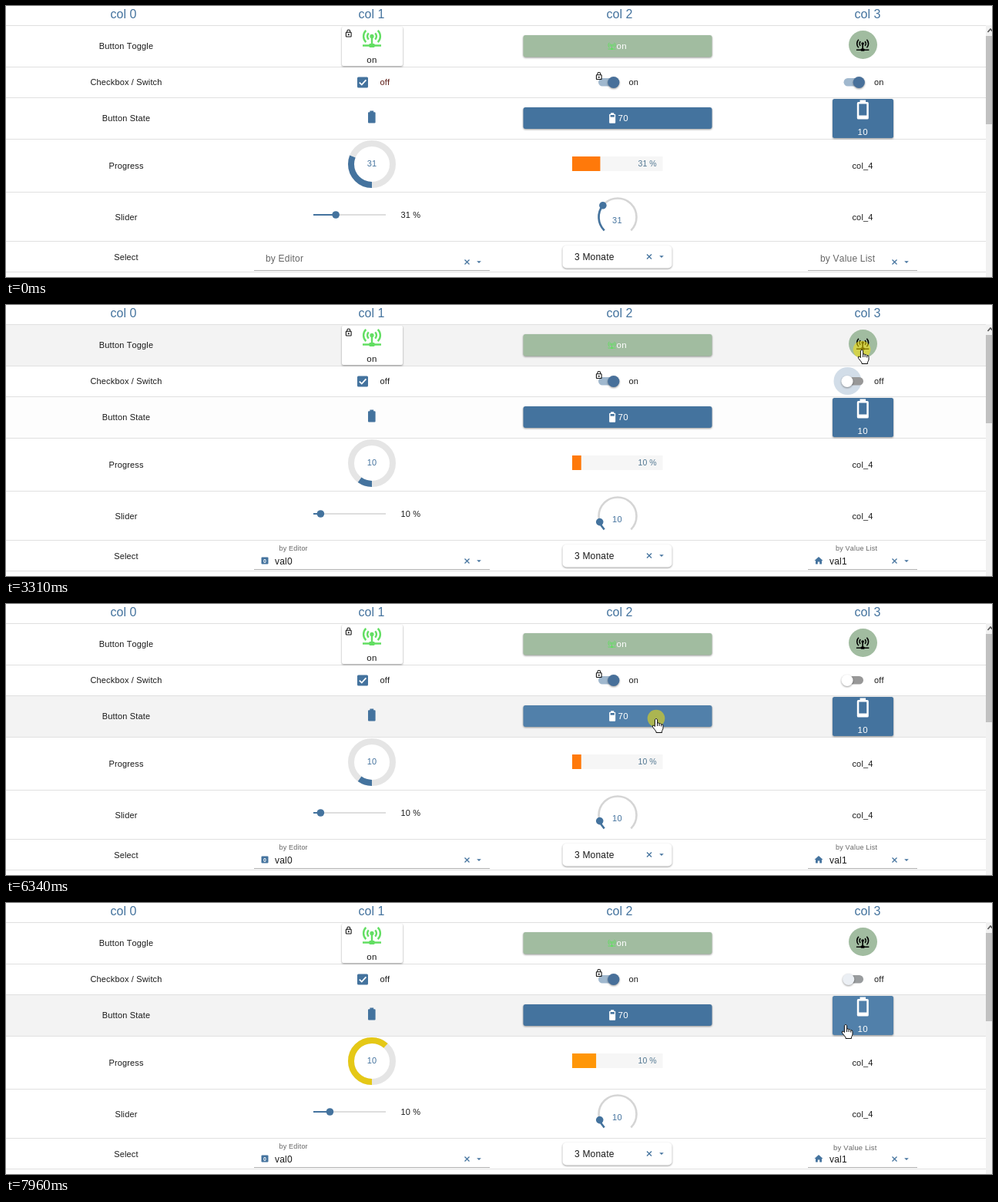
An HTML page for the animation above (8000 ms loop, 1280x353 px).

```html
<!DOCTYPE html>
<html lang="en">
<head>
<meta charset="utf-8">
<title>Table widgets</title>
<style>
html, body { margin: 0; width: 100%; height: 100%; overflow: hidden; background: #fff; }
svg { display: block; }
text { font: 11px "Liberation Sans", Arial, sans-serif; letter-spacing: .15px; font-kerning: none; fill: #1a1a1a; white-space: pre; }
.mid { text-anchor: middle; }
.head text { font-size: 16px; letter-spacing: 0; fill: #44739e; text-anchor: middle; }
.btn { font-size: 11.5px; letter-spacing: .45px; }
.val { font-size: 12px; letter-spacing: .2px; }
.hint { fill: #666; letter-spacing: .2px; }
.blue { fill: #44739e; color: #44739e; }
.white { fill: #fff; color: #fff; }
.green { color: #62de62; }
.red { color: #b01212; }
.raised { filter: drop-shadow(0 1px 1.2px rgba(0,0,0,.4)); }
.line { stroke: #e0e0e0; }
svg.toggled .on, svg:not(.toggled) .off { display: none; }
</style>
</head>
<body>
<svg id="stage" width="1280" height="353" viewBox="0 0 1280 353">
  <defs>
    <g id="antenna">
      <g fill="none" stroke="currentColor" stroke-width="2">
        <path d="M5.6 3.6A9 9 0 0 0 5.6 16.4M18.4 3.6A9 9 0 0 1 18.4 16.4M8.5 6.5A5 5 0 0 0 8.5 13.5M15.5 6.5A5 5 0 0 1 15.5 13.5"/>
        <path d="M12 11V19M2 20H22"/>
      </g>
      <circle cx="12" cy="10" r="2.2" fill="currentColor"/>
      <rect x="9" y="18" width="6" height="4" rx="1" fill="currentColor"/>
    </g>
    <g id="antennaOff">
      <use href="#antenna"/>
      <path d="M2.5 3L21 22" stroke="currentColor" stroke-width="2.2"/>
    </g>
    <g id="lock">
      <rect x="5" y="9" width="14" height="12" rx="1" fill="none" stroke="#111" stroke-width="2.2"/>
      <path d="M8 9V6A4 4 0 0 1 16 6V9" fill="none" stroke="#111" stroke-width="2.2"/>
      <circle cx="12" cy="15" r="2.2" fill="#111"/>
    </g>
    <path id="battery" d="M9 2H15V4H16.7Q18 4 18 5.3V20.7Q18 22 16.7 22H7.3Q6 22 6 20.7V5.3Q6 4 7.3 4H9Z" fill="currentColor"/>
    <path id="cross" d="M-3 -3L3 3M3 -3L-3 3" stroke="#44739e" stroke-width="1.3"/>
    <path id="caret" d="M-2.8 -1.3H2.8L0 1.6Z" fill="#44739e"/>
  </defs>

  <rect width="1280" height="353" fill="#fff"/>
  <g id="rows"></g>
  <g class="head">
    <text x="152.5" y="15.5">col 0</text><text x="474.5" y="15.5">col 1</text>
    <text x="796.5" y="15.5">col 2</text><text x="1118.5" y="15.5">col 3</text>
  </g>

  <!-- scrollbar -->
  <rect x="1272" y="25" width="8" height="328" fill="#f1f1f1"/>
  <rect x="1272" y="39" width="8" height="115" fill="#c1c1c1"/>
  <path d="M1274.5 34L1278 30L1281.5 34" fill="none" stroke="#555" stroke-width="1.6"/>

  <!-- toggles -->
  <g class="on">
    <rect class="raised" x="436" y="27" width="79" height="51" rx="2" fill="#fff"/>
    <use href="#antenna" class="green" transform="translate(460.6 27.5) scale(1.2)"/>
    <text class="btn mid" x="475" y="74">on</text>
    <rect class="raised" x="671.5" y="38" width="245" height="28.5" rx="3" fill="#a1bca0"/>
    <use href="#antenna" class="green" transform="translate(780.5 46) scale(.5)"/>
    <text class="btn white" x="792.5" y="56">on</text>
    <circle cx="1112.5" cy="50.5" r="18.5" fill="#a1bca0"/>
    <use href="#antenna" transform="translate(1102.3 40.8) scale(.82)"/>
  </g>
  <g class="off">
    <rect class="raised" x="436" y="27" width="79" height="51" rx="2" fill="#4f6f8f"/>
    <use href="#antennaOff" color="#971a1e" transform="translate(460.6 27.5) scale(1.2)"/>
    <text class="btn mid white" x="475" y="74">off</text>
    <rect class="raised" x="671.5" y="38" width="245" height="28.5" rx="3" fill="#44739e"/>
    <use href="#antennaOff" class="red" transform="translate(780.5 46) scale(.5)"/>
    <text class="btn white" x="792" y="56">off</text>
    <circle cx="1112.5" cy="50.5" r="18.5" fill="#ececec"/>
    <use href="#antennaOff" class="red" transform="translate(1102.3 40.8) scale(.82)"/>
  </g>
  <use href="#lock" transform="translate(439 30) scale(.48)"/>

  <!-- checkbox and switches -->
  <g class="on">
    <rect x="456" y="92.5" width="14" height="14" rx="1.5" fill="#44739e"/>
    <path d="M458.8 99.6L461.8 102.6L467.4 96.4" fill="none" stroke="#fff" stroke-width="1.7"/>
    <text id="checkText" x="485.5" y="103">off</text>
  </g>
  <g class="off">
    <rect x="456.8" y="93.2" width="12.6" height="12.6" rx="1.5" fill="#fff" stroke="#666" stroke-width="1.5"/>
    <text x="485.5" y="103">on</text>
  </g>
  <g id="switch2"></g>
  <use href="#lock" transform="translate(764 85.5) scale(.48)"/>
  <circle id="halo" cy="99" r="18" fill="#44739e" opacity=".24"/>
  <g id="switch3"></g>

  <!-- state buttons -->
  <use href="#battery" class="blue" transform="translate(465.2 135) scale(.8)"/>
  <rect id="state2" class="raised" x="671.5" y="132" width="245" height="28" rx="3"/>
  <use href="#battery" class="white" transform="translate(779.1 138) scale(.67)"/>
  <rect x="784.6" y="142" width="5.2" height="2.6" fill="#44739e"/>
  <text class="btn white" x="794.5" y="150">70</text>
  <rect id="state3" class="raised" x="1073" y="121" width="79" height="51" rx="2.5"/>
  <use href="#battery" class="white" transform="translate(1097.3 120) scale(1.25)"/>
  <rect id="hole3" x="1107.3" y="127.5" width="10" height="15"/>
  <text class="btn mid white" x="1112.3" y="168">10</text>

  <!-- progress -->
  <circle cx="475" cy="206" r="27" fill="none" stroke="#e5e5e5" stroke-width="8"/>
  <circle id="ring" cx="475" cy="206" r="27" fill="none" stroke-width="8" pathLength="100" transform="rotate(90 475 206)"/>
  <text id="ringText" class="mid blue" x="475" y="209"></text>
  <rect x="735" y="196" width="117.5" height="19" fill="#f6f6f6"/>
  <rect id="bar" x="735" y="196" height="19"/>
  <text id="barText" x="844.5" y="209" text-anchor="end" style="font-size:10.5px;fill:#4f7590;letter-spacing:0"></text>
  <text class="mid" x="1112" y="212">col_4</text>

  <!-- sliders -->
  <path d="M399 272H493" stroke="#dedede" stroke-width="2"/>
  <path id="fill" stroke="#44739e" stroke-width="2"/>
  <circle id="thumb" class="blue" cy="272" r="4.8"/>
  <text id="slideText" x="512.5" y="276"></text>
  <g fill="none" stroke-width="2.6" transform="rotate(135 794 275)">
    <circle cx="794" cy="275" r="24.5" stroke="#d5d5d5" pathLength="100" stroke-dasharray="75 100"/>
    <circle id="arc" cx="794" cy="275" r="24.5" stroke="#44739e" pathLength="100"/>
  </g>
  <circle id="knob" class="blue" cx="818.5" cy="275" r="4.8"/>
  <text id="knobText" class="mid blue" x="793.5" y="283" style="letter-spacing:.4px"></text>
  <text class="mid" x="1112" y="279">col_4</text>

  <!-- selects -->
  <path d="M322 344.5H628M1041 344.5H1183" stroke="#b0b0b0"/>
  <text id="label1" class="hint">by Editor</text>
  <text id="pick1" class="val" x="349" y="338"></text>
  <g id="zero">
    <rect class="blue" x="331.5" y="328.5" width="9" height="9" rx="1"/>
    <text class="mid white" x="336" y="335.6" style="font-size:7px;font-weight:bold">0</text>
  </g>
  <g id="person" class="blue">
    <circle cx="335" cy="330.4" r="2.2"/>
    <path d="M330.5 337V335.5Q331 333.6 335 333.6T339.5 335.5V337ZM339.5 329H341V333H339.5ZM339.5 334H341V335.3H339.5Z"/>
  </g>
  <use href="#cross" x="598.5" y="333.5"/><use href="#caret" x="614" y="333.5"/>
  <rect class="raised" x="722.5" y="312" width="142" height="29.5" rx="5" fill="#fff"/>
  <text class="val" x="738" y="330.5">3 Monate</text>
  <use href="#cross" x="835" y="326.5"/><use href="#caret" x="851" y="326.5"/>
  <text id="label3" class="hint">by Value List</text>
  <g id="home">
    <path class="blue" d="M1055 328L1060.5 333H1059V337.5H1056.2V334.5H1053.8V337.5H1051V333H1049.5Z"/>
    <text class="val" x="1069" y="338">val1</text>
  </g>
  <use href="#cross" x="1153.5" y="333.5"/><use href="#caret" x="1169" y="333.5"/>

  <circle id="press" r="11.3" fill="#ffe600" opacity=".52"/>
  <g id="cursor" fill="#fff" stroke="#111" stroke-linejoin="round">
    <path id="hand" d="M-1.6 1.5Q0 -.8 1.6 1.5V6Q3.3 5.2 4.1 6.8Q6 6.1 6.7 7.7Q8.9 7.2 9 9.5V13Q8.6 15 7.5 16.5V18.5H0V17L-4.5 11.3Q-5.5 8.4 -3 9.2L-1.6 10.6ZM1.6 6V10M4.1 7V10M6.7 8V10.5"/>
    <path id="arrow" d="M0 0V13.5L3.1 10.8L5.3 16L7.4 15.1L5.3 10H9.4Z"/>
  </g>
</svg>
<script>
const LOOP = 8000;
const $ = id => document.getElementById(id);
const set = (id, attrs) => { for (const k in attrs) $(id).setAttribute(k, attrs[k]); };
const show = (id, on) => set(id, { visibility: on ? 'visible' : 'hidden' });
const lerp = (a, b, p) => a + (b - a) * p;
const mix = (a, b, p) => `rgb(${a.map((c, i) => Math.round(lerp(c, b[i], p)))})`;
const clamp = p => Math.max(0, Math.min(1, p));
const inOut = p => p * p * (3 - 2 * p);

// CSS "ease": cubic-bezier(.25, .1, .25, 1)
function ease(p) {
  let lo = 0, hi = 1, u = p;
  for (let i = 0; i < 18; i++) {
    u = (lo + hi) / 2;
    const x = .75 * u * (1 - u) ** 2 + .75 * u * u * (1 - u) + u ** 3;
    if (x < p) lo = u; else hi = u;
  }
  return .3 * u * (1 - u) ** 2 + 3 * u * u * (1 - u) + u ** 3;
}

const rowEdges = [25, 79, 119, 173, 242, 306, 346];
const rowNames = ['Button Toggle', 'Checkbox / Switch', 'Button State', 'Progress', 'Slider', 'Select'];
const baselines = [56, 103, 150, 212, 279, 331];
$('rows').innerHTML = rowNames.map((name, i) =>
  `<rect id="row${i}" y="${rowEdges[i]}" width="1272" height="${rowEdges[i + 1] - rowEdges[i]}"/>` +
  `<text class="mid" x="156" y="${baselines[i]}">${name}</text>`).join('') +
  rowEdges.map(y => `<path class="line" d="M0 ${y + .5}H1272"/>`).join('');

for (const [n, x] of [[2, 769], [3, 1087.5]]) {
  $('switch' + n).innerHTML = `<rect id="track${n}" x="${x}" y="94" width="26" height="10.5" rx="5.2"/>` +
    `<circle id="dot${n}" class="raised" cy="99.5" r="7.6"/><text id="text${n}" x="${x + 39.5}" y="103"></text>`;
}

const values = [[0, 31], [1280, 10], [6560, 70], [7840, 10]];
const toggles = [[0, 1], [3500, 0], [5400, 1]];
const presses = [1050, 3310, 5180, 6340, 7660];
const path = [
  [280, 1192, 336], [900, 1099, 101], [1500, 1099, 101], [1900, 1111, 58], [5480, 1111, 58],
  [5680, 1095, 130], [5950, 844, 149], [6680, 844, 149], [7130, 1057, 158], [7190, 1072, 157],
  [7350, 1072, 157], [7430, 1090, 158]
];

const step = (track, t) => track.filter(k => k[0] <= t).pop()[1];

// Value of a stepped track, eased over ms after each step and passed through f
function glide(track, t, ms, f = v => v, delay = 0) {
  const i = track.filter(k => k[0] <= t).length - 1;
  const to = f(track[i][1]);
  return i ? lerp(f(track[i - 1][1]), to, ease(clamp((t - track[i][0] - delay) / ms))) : to;
}

function pointer(t) {
  const i = path.findIndex(k => k[0] > t);
  if (i < 0) return path[path.length - 1].slice(1);
  if (!i) return [-99, -99];
  const [a, b] = [path[i - 1], path[i]];
  const p = inOut((t - a[0]) / (b[0] - a[0]));
  return [lerp(a[1], b[1], p), lerp(a[2], b[2], p)];
}

function drawSwitch(n, x, p, on, offTrack) {
  set('track' + n, { x: x + p * .5, fill: mix(offTrack, [160, 184, 206], p) });
  set('dot' + n, { cx: lerp(x + 5, x + 20.3, p), fill: mix([255, 255, 255], [72, 112, 154], p) });
  $('text' + n).textContent = on ? 'on' : 'off';
}

function drawLabel(id, x, x2, p) {
  set(id, { x: lerp(x, x2, p), y: lerp(333, 319.7, p), style: `font-size:${lerp(12, 9, p)}px` });
}

const gold = [255, 214, 0], blue = [68, 115, 158], orange = [255, 121, 10], grey = [152, 152, 152];

function draw(t) {
  const v = step(values, t), on = step(toggles, t);
  const [x, y] = pointer(t);
  const inside = (l, u, r, b) => x > l && x < r && y > u && y < b;
  $('stage').classList.toggle('toggled', !on);

  rowNames.forEach((_, i) => {
    const hot = y >= rowEdges[i] && y < rowEdges[i + 1];
    const trace = i === 2 && t > 700 && t < 5600;
    set('row' + i, { fill: hot ? '#f3f3f3' : trace ? '#fdfdfd' : '#fff' });
  });

  const slide = glide(values, t, 200, n => +(n !== 10));
  drawSwitch(2, 768.5, glide(toggles, t, 200), on, grey);
  drawSwitch(3, 1087, slide, v !== 10, on ? grey : [146, 176, 152]);
  const overSwitch = inside(1082, 90, 1120, 110);
  set('halo', { cx: lerp(1092.5, 1107.5, slide) });
  show('halo', overSwitch || (t > 900 && t < 3500));
  $('checkText').style.fill = t < 1500 ? '#5c1a14' : '#1a1a1a';

  const over2 = inside(671, 132, 917, 160), over3 = inside(1073, 121, 1152, 172);
  const face = hot => hot ? '#5180aa' : '#44739e';
  set('state2', { fill: face(over2) });
  set('state3', { fill: face(over3) });
  set('hole3', { fill: face(over3) });

  const isGold = n => +(n === 70);
  set('ring', {
    'stroke-dasharray': `${glide(values, t, 600, n => n, 45)} 100`,
    stroke: mix(blue, gold, glide(values, t, 600, isGold, 45))
  });
  set('bar', { width: 1.175 * glide(values, t, 280), fill: mix(orange, gold, glide(values, t, 300, isGold)) });
  const sx = 399 + .94 * glide(values, t, 250);
  set('fill', { d: `M399 272H${sx}` });
  set('thumb', { cx: sx });
  set('arc', { 'stroke-dasharray': `${v * .75} 100` });
  set('knob', { transform: `rotate(${135 + v * 2.7} 794 275)` });
  $('ringText').textContent = $('knobText').textContent = v;
  $('barText').textContent = $('slideText').textContent = v + ' %';

  drawLabel('label1', 337, 354.5, glide(values, t, 180, n => +(n !== 31)));
  drawLabel('label3', 1057, 1077, glide(values, t, 220, n => +(n === 10)));
  $('pick1').textContent = { 31: '', 10: 'val0', 70: 'val1' }[v];
  show('zero', v === 10);
  show('person', v === 70);
  show('home', v === 10);

  const hand = over2 || over3 || overSwitch || Math.hypot(x - 1112.5, y - 50.5) < 18.5;
  show('hand', hand);
  show('arrow', !hand);
  set('cursor', { transform: `translate(${x} ${y})` });
  set('press', { cx: x, cy: y });
  show('press', presses.some(p => t >= p && t < p + 155));
}

const start = performance.now();
function tick() {
  draw((performance.now() - start) % LOOP);
  requestAnimationFrame(tick);
}
tick();
</script>
</body>
</html>
```
